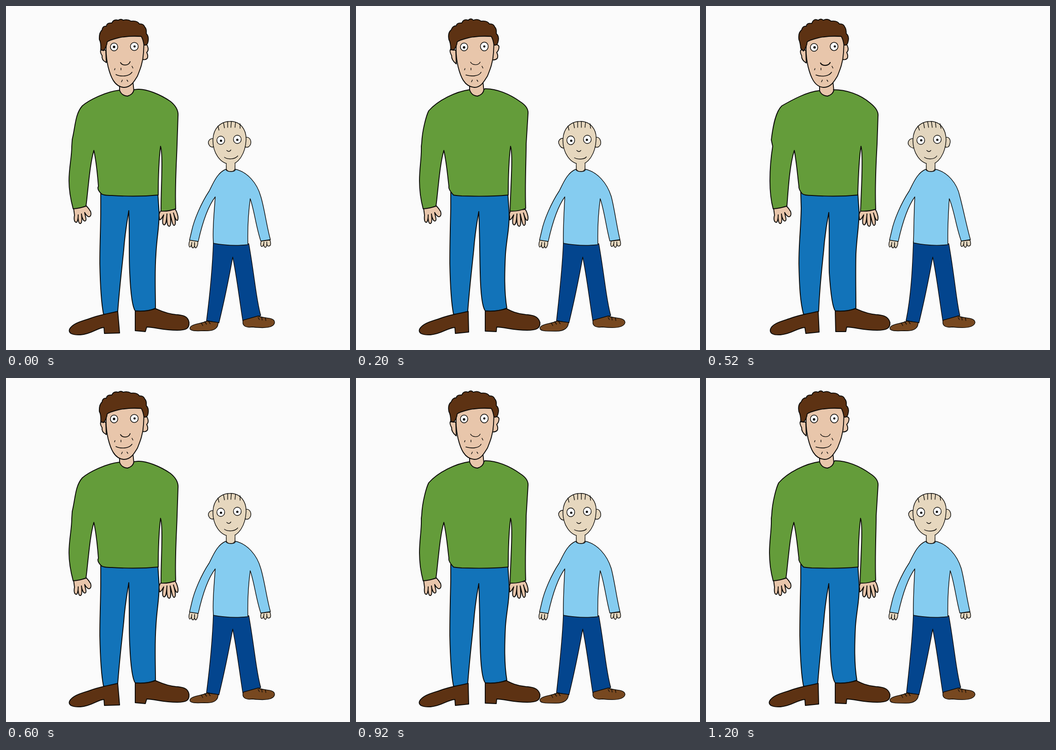
Animation, 748 px wide and 748 px high, one loop 1.4 s. Source, as an HTML page:

```html
<!DOCTYPE html>
<html lang="en">
<head>
<meta charset="utf-8">
<title>Man and boy</title>
<style>
html, body { margin: 0; width: 100%; height: 100%; overflow: hidden; background: #fbfbfb; }
svg { display: block; width: 100%; height: 100%; }
g { stroke: #0b0a08; stroke-linecap: round; stroke-linejoin: round; }
</style>
</head>
<body>
<svg id="stage" viewBox="0 0 748 748"></svg>
<script>
const STEP = 200;
const ORDER = [0, 1, 2, 0, 1, 2, 1];
const stage = document.getElementById('stage');

const shape = (fill, d) => `<path fill="${fill}" d="${d}"/>`;
const line = (d, width = 1.4) => `<path fill="none" stroke-width="${width}" d="${d}"/>`;
const eye = (x, y, rx, ry, px, py, pr) =>
  `<ellipse cx="${x}" cy="${y}" rx="${rx}" ry="${ry}" fill="#fff"/>` +
  `<circle cx="${px}" cy="${py}" r="${pr}" fill="#0b0a08" stroke="none"/>`;

// k picks the value that belongs to one of the three drawings
function man(k) {
  const skin = '#e8c6ab', brown = '#5d3213';
  return `<g stroke-width="1.9">` +
    // trousers
    shape('#1273b9', `M206 405 L${k(206, 206, 207)} 440 C${k(206, 205, 206)} 490 ${k(204, 204, 202)} 510 ${k(204, 204, 202)} 560
      C${k(205, 205, 203)} 610 ${k(207, 207, 205)} 645 212 670 Q229 671 ${k(243, 243, 245)} 664 C247 610 252 570 256 530
      C259 490 264 465 267 ${k(445, 447, 449)} C269 490 ${k(267, 269, 267)} 545 ${k(269, 270, 268)} 580
      C271 625 275 655 281 663 Q306 666 ${k(325, 328, 326)} 657 C${k(325, 322, 326)} 620 ${k(323, 323, 325)} 580 ${k(326, 325, 326)} 540
      C328 500 ${k(333, 334, 332)} 485 333 450 L330 405 Z`) +
    // shoes
    shape(brown, `M${k(243, 244, 244)} 664 L${k(247, 245, 246)} ${k(711, 709, 709)} L${k(214, 216, 217)} 712 L${k(213, 215, 215)} 699
      C198 700 187 713 162 715 C146 716 ${k(135, 135, 138)} 712 ${k(138, 138, 140)} 703
      C144 690 166 685 181 680 C201 672 213 671 ${k(243, 244, 244)} 664 Z`) +
    shape(brown, `M281 663 L${k(281, 281, 282)} ${k(706, 707, 708)} L${k(303, 305, 304)} 708 L306 698
      C322 698 342 705 372 705 C391 705 ${k(399, 401, 401)} 702 ${k(398, 400, 400)} 688
      C396 674 384 672 369 671 C347 669 335 662 ${k(325, 327, 325)} 658 Q306 665 281 663 Z`) +
    // hands
    shape(skin, `M147 440 L149 455 C${k(147, 148, 146)} 464 149 472 154 470 C156 467 157 460 157 454 C156 464 158 474 162 473
      C166 471 165 460 164 452 C165 461 169 470 173 467 C176 464 172 457 171 449
      C174 455 180 461 183 457 Q186 454 184 447 Q180 440 175 435 Z`) +
    shape(skin, `M337 445 Q332 451 ${k(333, 334, 333)} 457 L334 465 Q337 465 340 459 L343 454
      C340 464 339 475 344 476 C349 475 349 463 350 452 C349 465 350 479 355 479 C360 478 358 462 357 452
      C360 463 362 478 366 477 C371 474 367 460 364 450 C367 459 370 468 373 466 C376 460 372 448 368 442 Z`) +
    // neck
    shape(skin, `M247 165 L247 188 Q253 196 264 196 Q275 194 278 184 L276 165 Z`) +
    // sweater
    shape('#649c3a', `M247 ${k(183, 182, 184)} C${k(217, 217, 220)} 186 ${k(180, 178, 186)} 205 ${k(166, 158, 165)} ${k(217, 228, 217)}
      C${k(150, 153, 152)} ${k(235, 238, 229)} ${k(151, 144, 146)} ${k(262, 270, 258)} ${k(144, 143, 142)} ${k(290, 297, 291)}
      L${k(143, 142, 145)} 305 C${k(143, 143, 141)} 330 ${k(137, 138, 139)} 350 ${k(137, 138, 139)} 380
      C${k(137, 138, 139)} 404 142 426 146 441 Q161 440 ${k(174, 174, 176)} 435 C179 395 182 345 ${k(191, 191, 192)} 314
      C197 340 199 368 ${k(201, 202, 202)} 392 Q${k(197, 200, 201)} 398 ${k(207, 212, 209)} ${k(408, 411, 408)}
      Q${k(211, 215, 214)} 412 230 ${k(412, 413, 412)} C262 414 300 414 ${k(331, 331, 330)} 411
      C331 375 333 330 ${k(336, 336, 337)} 305 C342 322 ${k(337, 336, 338)} 400 ${k(337, 335, 336)} 446
      Q353 447 369 ${k(441, 440, 442)} C367 390 ${k(371, 370, 370)} 335 ${k(372, 370, 372)} 300
      L374 ${k(240, 235, 240)} Q376 ${k(222, 220, 226)} 357 ${k(207, 208, 211)}
      C335 192 305 ${k(180, 179, 182)} ${k(287, 280, 277)} ${k(181, 180, 182)} L278 182
      Q277 192 264 196 Q251 195 247 ${k(183, 182, 184)} Z`) +
    // ears and face
    shape(skin, `M217 96 L${k(207, 205, 207)} 95 Q203 99 ${k(209, 208, 208)} 108 Q207 117 218 ${k(123, 126, 124)} Z`) +
    shape(skin, `M299 84 Q${k(307, 308, 307)} 82 ${k(308, 311, 308)} 88 Q311 96 306 101 Q310 109 307 114 Q303 118 297 ${k(116, 117, 116)} Z`) +
    shape(skin, `M219 75 C216 95 218 114 222 132 C227 152 235 176 ${k(257, 258, 256)} 177
      C272 177 279 163 286 152 C292 137 298 122 299 101 L300 80 L295 66 L240 64 Z`) +
    // hair
    shape(brown, `M212 ${k(97, 96, 98)} L206 ${k(95, 94, 92)} Q${k(207, 206, 205)} 80 ${k(203, 202, 202)} 73 Q${k(202, 199, 200)} 58 ${k(209, 207, 208)} 52
      Q210 43 218 ${k(44, 43, 44)} Q219 36 230 ${k(37, 37, 38)} Q234 ${k(28, 27, 26)} 244 31 Q250 ${k(27, 25, 26)} 255 31
      Q264 ${k(28, 27, 26)} 272 33 Q285 31 290 39 Q299 38 302 46 Q${k(306, 306, 305)} 50 305 60
      Q${k(311, 312, 312)} 66 309 77 Q308 86 300 85 Q298 72 294 66
      Q270 64 245 69 Q225 74 220 78 Q219 89 212 ${k(97, 96, 98)} Z`) +
    // features
    `<g stroke-width="1.5">` +
    eye(235, k(89, 89, 90), 8, 8.5, k(235, 235, 236), k(89, 90, 90), 2.7) +
    eye(k(279, 279, 278.5), k(88, 88, 88), 8.5, k(8.7, 9.5, 9), k(279.5, 279, 280), 88, 2.4) + `</g>` +
    line(`M249 ${k(123, 122, 124)} C253 ${k(130, 129, 131)} 266 ${k(131, 130, 131)} 270 ${k(121, 122, 123)}`, k(1.8, 1.4, 2.2)) +
    line(`M239 ${k(149, 150, 150)} C249 ${k(154, 153, 154)} 267 154 ${k(274, 272, 273)} 144`, 1.6) +
    line(`M237 136 l-1 3 M250 135 l0 4 M274 131 l2 4 M253 161 l-2 4 M263 161 l2 3`, 1.4) +
    `</g>`;
}

function boy(k) {
  const skin = k('#e6d7be', '#e6d7be', '#e2d5be'), shoe = '#774820';
  return `<g stroke-width="1.4">` +
    // trousers
    shape('#03458e', `M451 512 C449 570 ${k(443, 442, 446)} 630 ${k(436, 436, 435)} 684 L463 689
      C475 640 485 590 493 546 C502 590 507 635 515 685 L${k(554, 554, 552)} 673 C544 640 541 590 528 517 Z`) +
    // shoes
    shape(shoe, `M437 685 C425 691 402 691 400 700 C399 707 412 707 432 ${k(706, 707, 706)} C455 708 462 698 ${k(461, 462, 461)} 688 Z`) +
    shape(shoe, `M516 683 C512 695 521 700 536 698 C562 701 583 700 ${k(584, 585, 585)} 688
      C584 676 561 680 548 674 Z`) +
    line(`M425 690 l3 5 M432 686 l4 6 M440 685 l4 6 M548 677 l3 5 M556 677 l1 6 M564 678 l1 6`) +
    // hands
    shape(skin, `M400 509 Q396 519 399 524 Q403 525 404 514 Q402 526 407 526 Q411 524 410 514
      Q409 526 413 526 Q418 521 417 511 Z`) +
    shape(skin, `M555 511 Q552 521 556 523 Q560 523 561 513 Q559 524 564 525 Q568 523 567 513
      Q567 523 571 522 Q578 522 574 509 Z`) +
    // neck
    shape(skin, `M479 340 L479 354 Q480 360 489 360 Q496 360 498 354 L498 340 Z`) +
    // shirt
    shape('#85ccf0', `M478 355 C460 362 451 384 442 402 C424 429 409 465 404 488 L399 509 L418 512
      C424 485 435 441 ${k(455, 454, 454)} 415 C452 455 ${k(449, 450, 452)} 490 451 ${k(516, 516, 515)} Q490 523 526 519
      C525 485 527 450 ${k(531, 531, 529)} 419 C540 445 544 482 ${k(554, 552, 555)} 511
      L${k(575, 574, 575)} 508 C567 480 ${k(562, 562, 559)} 440 ${k(554, 555, 552)} 414
      C546 385 525 361 499 355 Q498 361 488 360 Q480 360 478 355 Z`) +
    // ears and head
    shape(skin, `M452 ${k(289, 288, 289)} C443 286 438 295 ${k(441, 442, 440)} 301 Q445 309 452 ${k(306, 309, 309)} Z`) +
    shape(skin, `M520 286 C529 283 ${k(534, 533, 533)} 292 ${k(532, 532, 530)} 300 Q528 310 519 306 Z`) +
    shape(skin, `M487 251 C509 250 ${k(523, 524, 522)} 268 522 291 C521 319 506 344 488 344
      C465 343 449 318 450 290 C451 266 466 251 487 251 Z`) +
    `<path d="M479.8 341 L497.2 341 L497.2 347 L479.8 347 Z" fill="${skin}" stroke="none"/>` +
    line(`M461 261 l${k(2, 2, 3)} 9 M473 254 l2 11 M482 252 l${k(0, 0, 2)} 12
      M490 251 l${k(-1, 0, 2)} 13 M499 253 l${k(-1, -1, 1)} 11 M509 256 l${k(0, 1, 2)} 10`) +
    eye(467, 292, 8.5, k(9, 9.5, 9), k(467.5, 468, 468), k(293, 293, 292), 2.5) +
    eye(503, 290, 8.5, 9, k(503, 502, 503), 291, 2.5) +
    line(`M480 314 Q485 319 489 ${k(313, 314, 314)}`) +
    line(`M475 ${k(329, 330, 329)} C482 334 497 334 ${k(504, 501, 502)} ${k(326, 328, 326)}`) +
    `</g>`;
}

stage.innerHTML = [0, 1, 2].map(i => {
  const k = (...values) => values[i];
  return `<g>${man(k)}${boy(k)}</g>`;
}).join('');
const poses = [...stage.children];

function tick() {
  const shown = ORDER[Math.floor(performance.now() / STEP) % ORDER.length];
  poses.forEach((pose, i) => { pose.style.display = i === shown ? '' : 'none'; });
  requestAnimationFrame(tick);
}
tick();
</script>
</body>
</html>
```
